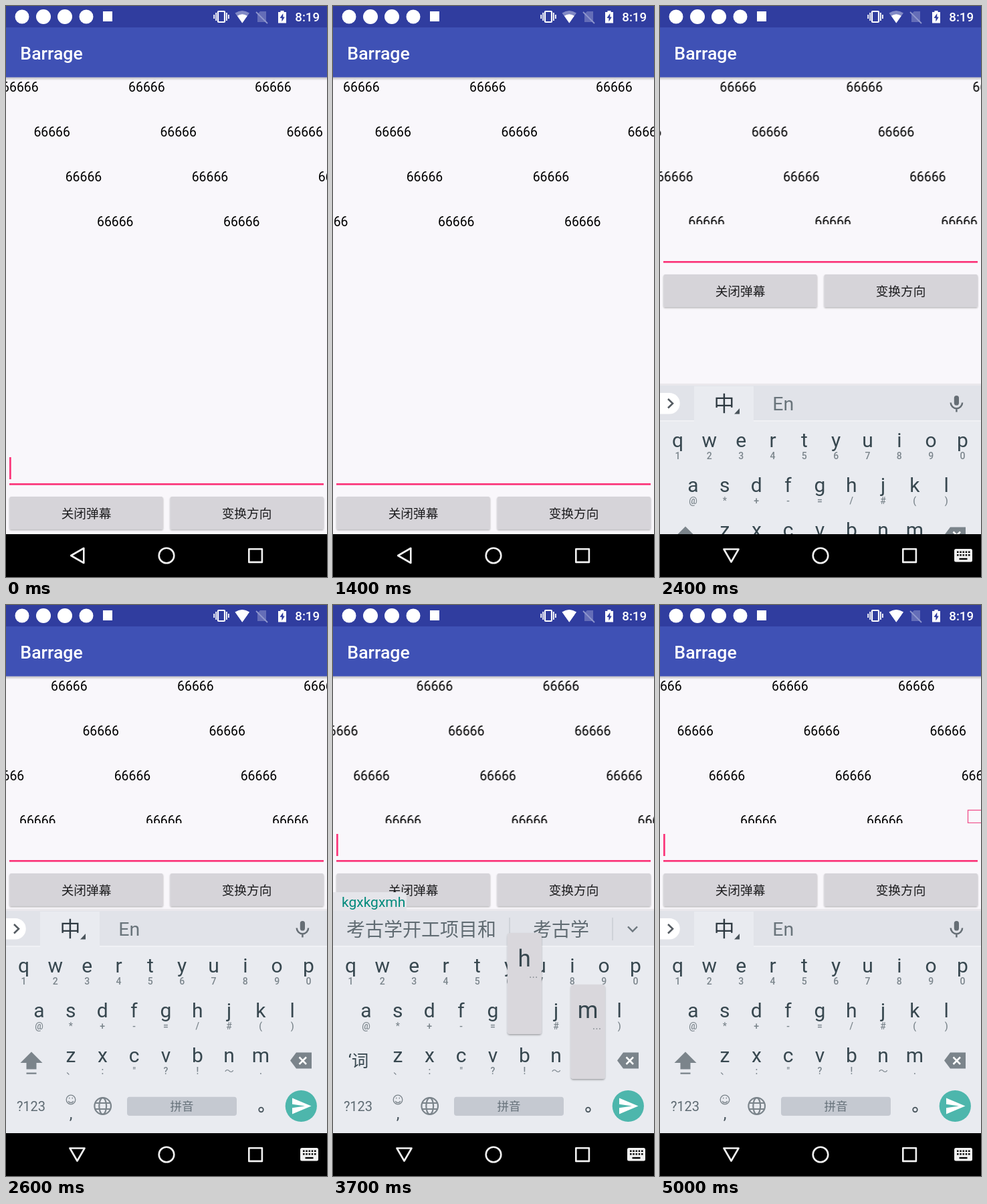
An HTML page that plays this animation: 480 px wide and 853 px high, repeating every 5.1 s.

```html
<!DOCTYPE html>
<html lang="zh-CN">
<head>
<meta charset="utf-8">
<title>Barrage</title>
<style>
html, body { margin: 0; width: 100%; height: 100%; overflow: hidden; background: #f9f7fb; }
svg { display: block; }
text { font-family: Roboto, "Noto Sans CJK SC", sans-serif; text-anchor: middle; white-space: pre; }
.start { text-anchor: start; }
.bold { font-weight: 500; }
#flow { animation: flow 5100ms infinite; }
#panel { animation: lift 5100ms steps(1) infinite; }
#kb { animation: slide 5100ms steps(1) infinite; }
@keyframes flow {
  0% { transform: translateX(0); animation-timing-function: steps(14); }
  27.451% { transform: translateX(-168px); animation-timing-function: steps(6); }
  39.2157% { transform: translateX(-238px); animation-timing-function: steps(6); }
  50.9804% { transform: translateX(-305px); animation-timing-function: steps(6); }
  62.7451% { transform: translateX(-379px); animation-timing-function: steps(10); }
  82.3529% { transform: translateX(-494px); animation-timing-function: steps(8); }
  98.0392%, 100% { transform: translateX(-583px); }
}
@keyframes lift {
  0% { transform: translateY(0); }
  47.0588%, 100% { transform: translateY(-332px); }
}
@keyframes slide {
  0% { transform: translateY(400px); }
  47.0588% { transform: translateY(110px); }
  49.0196%, 100% { transform: translateY(0); }
}
</style>
</head>
<body>
<svg id="stage" width="480" height="853" viewBox="0 0 480 853">
  <defs>
    <filter id="shade" x="-20%" y="-20%" width="140%" height="150%">
      <feDropShadow dx="0" dy="1.5" stdDeviation="1.3" flood-opacity=".32"/>
    </filter>
    <linearGradient id="fade" x2="0" y2="1">
      <stop stop-opacity=".24"/><stop offset="1" stop-opacity="0"/>
    </linearGradient>
  </defs>
  <rect width="480" height="853" fill="#f9f7fb"/>

  <g id="flow"><rect x="1043.5" y="306.5" width="216" height="19" fill="none" stroke="#f0508c" stroke-width="1.3"/></g>

  <g id="panel">
    <rect y="658" width="480" height="195" fill="#f9f7fb"/>
    <rect x="5" y="713" width="470" height="2.7" fill="#fb3579"/>
    <rect id="caret" x="5" y="674" width="2.7" height="33" fill="#fb3579"/>
    <g id="typed">
      <text class="start" x="5.5" y="701" font-size="24" fill="#212121">考古学开工项目和</text>
      <rect id="endCaret" x="196.7" y="674" width="2.7" height="33" fill="#fb3579"/>
    </g>
    <g fill="#d6d4d9" filter="url(#shade)">
      <rect x="5.3" y="733" width="229.5" height="48.5" rx="2.6"/>
      <rect x="245.5" y="733" width="229.5" height="48.5" rx="2.6"/>
    </g>
    <g font-size="18.67" fill="#1c1c1e">
      <text x="120" y="764.5">关闭弹幕</text>
      <text x="360" y="764.5">变换方向</text>
    </g>
  </g>

  <rect y="106.3" width="480" height="5" fill="url(#fade)"/>
  <rect width="480" height="106.5" fill="#3f51b5"/>
  <rect width="480" height="32" fill="#303d9f"/>
  <text class="start bold" x="21.3" y="80" font-size="26.67" fill="#fff">Barrage</text>
  <g fill="#fff">
    <circle cx="24" cy="16" r="10.5"/><circle cx="56" cy="16" r="11"/>
    <circle cx="88" cy="16" r="11"/><circle cx="120" cy="16" r="10.5"/>
    <rect x="145" y="8" width="14" height="15"/>
    <rect x="317" y="8" width="10" height="16" rx="1" fill="none" stroke="#fff" stroke-width="2.2"/>
    <path d="M314.2 10v12M311.2 13v6M329.9 10v12M332.9 13v6" stroke="#fff" stroke-width="1.8"/>
    <path d="M342.5 10.5Q353.3 3.5 364 10.5L353.3 25.5Z" opacity=".4"/>
    <path d="M345.8 14.8Q353.3 9.8 360.8 14.8L353.3 25.5Z"/>
    <path id="wifi" d="M342.5 10.5Q353.3 3.5 364 10.5L353.3 25.5Z"/>
    <path d="M380 8H389V24H376V12Z" opacity=".25"/>
    <path d="M374 9L391 26" stroke="#8f97cd" stroke-width="1.8"/>
    <path d="M407 9H410.5V7H415.5V9H419V25.5H407Z"/>
    <path d="M414.3 11L409.5 18H412.4V23.5L416.8 16.4H414.3Z" fill="#303d9f"/>
    <text class="start bold" x="432.3" y="23" font-size="18.67">8:19</text>
  </g>

  <g id="kb">
    <rect y="454" width="480" height="4" fill="#000" opacity=".06"/>
    <rect y="457" width="480" height="332" fill="#e9ebf0"/>
    <rect y="457" width="480" height="53" fill="#e1e3e9"/>
    <rect y="509" width="480" height="1.5" fill="#f3f4f7"/>
    <g id="tabs">
      <rect x="51" y="458" width="89" height="53" fill="#e9ebf0"/>
      <path d="M0 468H14A15.7 15.7 0 0 1 14 499.5H0Z" fill="#fff"/>
      <path d="M12 477L19 483.8L12 490.5" fill="none" stroke="#555c62" stroke-width="2.6"/>
      <text x="96" y="495" font-size="31" fill="#2f3a42">中</text>
      <path d="M119 491V499.5H111Z" fill="#4a545b"/>
      <text x="184.3" y="494" font-size="28.5" fill="#69747b">En</text>
      <g fill="none" stroke="#666e75" stroke-width="2.5">
        <path d="M434.7 482.5A8.7 8.7 0 0 0 452.1 482.5M443.4 491.5V496.5"/>
        <rect x="439.8" y="472" width="7.2" height="14.5" rx="3.6" fill="#666e75" stroke="none"/>
      </g>
    </g>
    <g id="keys"></g>
    <g fill="#7b848b">
      <g id="shift"><path d="M38 667.5L54.5 684H45.5V693.5H30.5V684H21.5Z"/><rect x="30.5" y="698.5" width="15" height="2.3"/></g>
      <path d="M434 668.5H457V692.5H434L425 680.5Z"/>
      <path d="M438.5 675.5L449 686M449 675.5L438.5 686" stroke="#fff" stroke-width="2.5"/>
    </g>
    <text id="word" x="38" y="689.5" font-size="25.5" fill="#37474f">‘词</text>
    <text x="37.5" y="756" font-size="20" fill="#5f6b73">?123</text>
    <g fill="none" stroke="#7b848b" stroke-width="1.3">
      <circle cx="97" cy="739" r="6.8"/>
      <path d="M93.3 741A4 4 0 0 0 100.7 741M94.7 735.8V737.6M99.3 735.8V737.6"/>
      <g stroke-width="2.2">
        <circle cx="144.7" cy="748.5" r="12.3"/><ellipse cx="144.7" cy="748.5" rx="5.4" ry="12.3"/>
        <path d="M133.5 744H156M133.5 753H156"/>
      </g>
      <circle cx="381.5" cy="754" r="3.3" stroke="#45525a" stroke-width="1.7"/>
    </g>
    <text x="97" y="768" font-size="24" fill="#45525a">,</text>
    <rect x="181" y="734.7" width="164" height="28.3" rx="4" fill="#c5c9d1"/>
    <rect id="space" x="181" y="734.7" width="164" height="28.3" rx="4" fill="#aeb4bd"/>
    <text x="263" y="755.3" font-size="17.5" fill="#66717a">拼音</text>
    <circle cx="441.3" cy="748.5" r="23.6" fill="#4db6ac"/>
    <circle id="send" cx="441.3" cy="748.5" r="23.6" fill="#3a9b92"/>
    <path d="M428 736.5L456.5 748.5L428 760.5V751.2L447 748.5L428 745.8Z" fill="#fff"/>
  </g>

  <rect y="789" width="480" height="64"/>
  <g fill="none" stroke="#f2f2f2" stroke-width="2.6" stroke-linejoin="round">
    <path id="back" d="M97.2 821L116.3 810V832Z"/>
    <path id="down" d="M95.5 811.5H117.5L106.5 830.5Z"/>
    <circle cx="240" cy="821" r="11.3"/>
    <rect x="363.3" y="811.3" width="19.6" height="19.6"/>
    <g id="imeIcon">
      <rect x="440" y="811" width="27" height="19.5" rx="2.5" fill="#f2f2f2" stroke="none"/>
      <path d="M444 815.8H463.5M444 820.3H463.5" stroke="#000" stroke-dasharray="2.5 1.75"/>
      <path d="M447.5 826H459.5" stroke="#000" stroke-width="2.4"/>
    </g>
  </g>
</svg>
<script>
const LOOP = 5100;
const $ = id => document.getElementById(id);

function add(parent, tag, attrs, content = '') {
  const el = document.createElementNS('http://www.w3.org/2000/svg', tag);
  for (const k in attrs) el.setAttribute(k, attrs[k]);
  el.textContent = content;
  return parent.appendChild(el);
}
const label = (parent, str, x, y, size, fill, cls = '') =>
  add(parent, 'text', { x, y, fill, 'font-size': size, class: cls }, str);

// Visible from the 1st to the 2nd time, from the 3rd to the 4th, and so on.
function show(el, ...times) {
  const easing = 'steps(1)';
  const frames = [{ opacity: 0, offset: 0, easing }];
  times.forEach((t, i) => frames.push({ opacity: 1 - i % 2, offset: t / LOOP, easing }));
  frames.push({ opacity: times.length % 2, offset: 1 });
  el.animate(frames, { duration: LOOP, iterations: Infinity });
}

// Scrolling comments
for (let row = 0; row < 4; row++)
  for (let col = 0; col < 6; col++)
    label($('flow'), '66666', -5.9 + 47.3 * row + 189 * col, 128.4 + 66.7 * row, 19.4, '#000', 'start');

// Letter keys
const kb = $('kb');
const spots = {};
[
  ['qwertyuiop', '1234567890', 26.5, 549],
  ['asdfghjkl', '@*+-=/#()', 49.5, 616],
  ['zxcvbnm', '、:"?!～.', 97, 683]
].forEach(([letters, hints, left, base], row) => {
  [...letters].forEach((c, i) => {
    const x = left + 47.33 * i;
    spots[c] = { x, base, row };
    label($('keys'), c, x, base, 30, '#37474f');
    label($('keys'), hints[i], x, base + 17.8, 14, '#7b858c', 'bold');
  });
});

function popup(c, ...times) {
  const { x, base, row } = spots[c];
  const top = base - (row === 2 ? 116 : 126);
  const g = add(kb, 'g', {});
  add(g, 'rect', { x: x - 25.3, y: top, width: 51, height: base + 25 - top, rx: 4, fill: '#d9d7dc', filter: 'url(#shade)' });
  label(g, c, x, top + 49.5, 35, '#37474f');
  label(g, '...', x + 13.5, top + 67, 17, '#858b91');
  show(g, ...times);
}

function strip(words, edges, ...times) {
  const g = add(kb, 'g', {});
  words.forEach((w, i) => {
    const left = i ? edges[i - 1] : 0;
    label(g, w, (left + edges[i]) / 2, 494.5, 28, '#616c73');
    add(g, 'rect', { x: edges[i] - .6, y: 467, width: 1.3, height: 34, fill: '#c5c9cf' });
  });
  add(g, 'path', { d: 'M441 480.5L448 487.5L455 480.5', fill: 'none', stroke: '#6c767d', 'stroke-width': 2.4 });
  show(g, ...times);
}

function compose(str, from, to) {
  const w = 26 + 10.5 * str.length;
  const g = add(kb, 'g', {});
  add(g, 'path', { d: `M0 429H${w - 6}q6 0 6 6V457H0Z`, fill: '#e5e5ea' });
  label(g, str, 13, 451, 21, '#00897b', 'start');
  show(g, from, to);
}

strip(['考古学', '看过', '可', '开'], [120, 212, 300, 418], 3300, 3500);
strip(['考古学开工项目和', '考古学'], [264, 418], 3500, 4000);
strip(['政策', '不受', '社会', '我', '你'], [87.5, 172.5, 258, 337, 418], 4000, 4800);
compose('k', 3200, 3300);
compose('kgx', 3300, 3500);
compose('kgxkgx', 3500, 3700);
compose('kgxkgxmh', 3700, 4000);
[...'gkx'].forEach(c => popup(c, 3200, 3300, 3400, 3600));
[...'mh'].forEach(c => popup(c, 3600, 3800));

show($('tabs'), 0, 3300, 4800);
show($('shift'), 0, 3200, 4000);
show($('word'), 3200, 4000);
show($('space'), 3900, 4000);
show($('send'), 4700, 4900);
show($('caret'), 0, 200, 700, 1200, 1700, 2200, 2700, 3200, 3700, 4000, 4800);
show($('typed'), 4000, 4800);
show($('endCaret'), 4000, 4500);
show($('wifi'), 2500);
show($('back'), 0, 2400);
show($('down'), 2400);
show($('imeIcon'), 2400);
</script>
</body>
</html>
```
